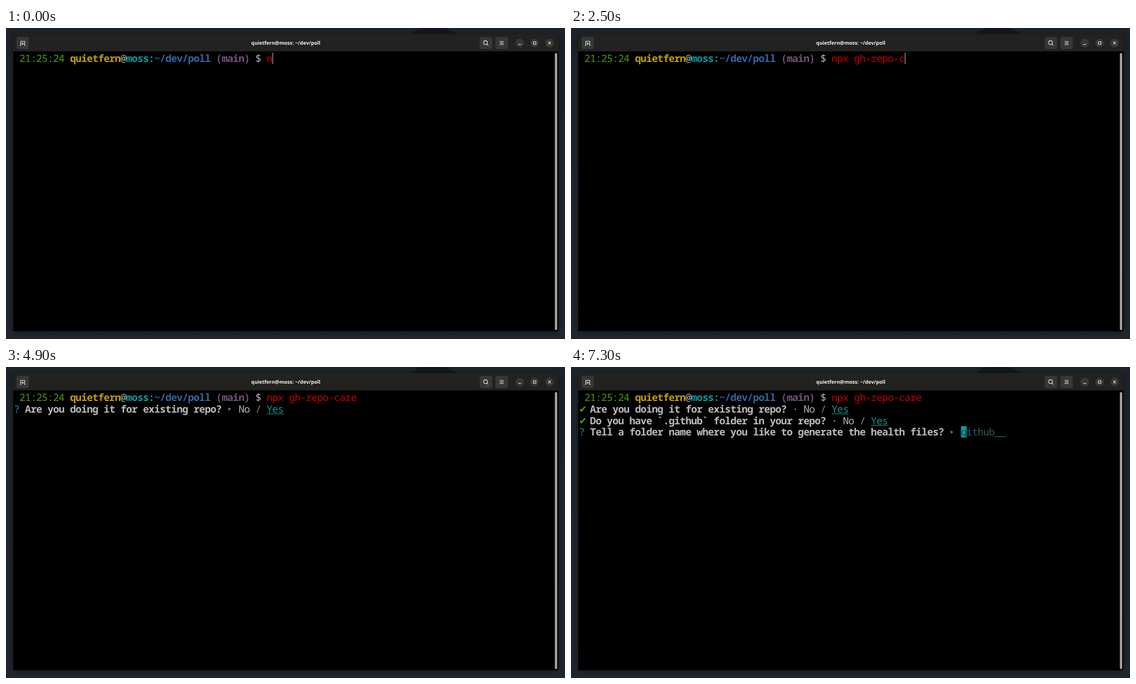
These frames come from a looping animation (1003 px wide and 559 px high, 8 s). An HTML page:

```html
<!DOCTYPE html>
<html lang="en">
<head>
<meta charset="utf-8">
<title>Terminal</title>
<style>
  html, body { margin: 0; width: 100%; height: 100%; overflow: hidden; background: #1e242b; }
  svg { display: block; width: 1003px; height: 559px; }
  text { text-rendering: geometricPrecision; }
  .term { font: 18px "Noto Sans Mono", monospace; letter-spacing: -.72px; }
  .bold { font-weight: 600; }
  .tick { font: 18px "DejaVu Sans", sans-serif; letter-spacing: 0; }
  .title { font: 700 9px "Open Sans", sans-serif; fill: #f4f4f2; text-anchor: middle; }
  .icon { fill: none; stroke: #eee; stroke-width: 1.1; }
</style>
</head>
<body>
<svg viewBox="0 0 1003 559">
  <defs>
    <linearGradient id="desk" x2="0" y2="1">
      <stop offset="0" stop-color="#1c232a"/>
      <stop offset="1" stop-color="#20262e"/>
    </linearGradient>
    <filter id="blur" x="-5%" y="-5%" width="110%" height="110%"><feGaussianBlur stdDeviation="4"/></filter>
  </defs>
  <rect width="1003" height="559" fill="url(#desk)"/>
  <path d="M726 12Q738 0 747 0H787Q800 5 810 12Z" fill="#12181d"/>
  <rect x="13" y="13" width="978" height="534" rx="9" opacity=".4" filter="url(#blur)"/>
  <path d="M13 545V20Q13 11 22 11H982Q991 11 991 20V545Z"/>
  <path d="M13 42V20Q13 11 22 11H982Q991 11 991 20V42Z" fill="#222220"/>
  <text class="title" x="502" y="30.4">quietfern@moss: ~/dev/poll</text>

  <g fill="#373735">
    <rect x="19" y="16" width="22" height="22" rx="4"/>
    <rect x="850" y="16" width="22.5" height="22" rx="4"/>
    <rect x="878" y="16" width="22.5" height="22" rx="4"/>
    <circle cx="921.7" cy="27" r="7.7"/>
    <circle cx="948.5" cy="27" r="7.7"/>
    <circle cx="975.3" cy="27" r="7.7"/>
  </g>
  <g class="icon">
    <path d="M25 31.3H26.5V24H33.5V31.3H35M30 26V30.4M27.8 28.2H32.2"/>
    <circle cx="860.3" cy="26.3" r="3.4"/>
    <path d="M862.8 28.8L865.4 31.4M885.8 24.2H892.8M885.8 27H892.8M885.8 29.8H892.8"/>
    <path d="M919.3 29.5H924.3M946.3 24.8H950.8V29.3H946.3ZM973 24.7L977.6 29.3M977.6 24.7L973 29.3"/>
  </g>
  <rect x="984.8" y="45" width="4.2" height="498" rx="2.1" fill="#a5a3a0"/>
  <g id="screen" class="term"></g>
</svg>
<script>
const LOOP = 8000, LEFT = 14.3, CELL = 10.08, TOP = 44.3, LINE = 20.7;
const BASELINE = 16.9, BEARING = -.36;
const GREEN = '#4e9a06', TEAL = '#16918f', GREY = '#b4b4b4', DIM = '#858585', WHITE = '#bababa';
const COMMAND = 'npx gh-repo-care';
const COMMAND_COL = 45;
// Time and number of characters typed from then on.
const TYPING = [[0, 1], [300, 2], [500, 3], [700, 4], [900, 5], [1100, 6], [1400, 7], [1600, 8],
  [1800, 9], [1900, 10], [2000, 11], [2200, 12], [2500, 13], [2700, 15], [2900, 16]];
const PROMPT = [
  [1, '21:25:24', GREEN], [10, 'quietfern', '#c4a000', 'bold'], [19, '@', GREY],
  [20, 'moss:', '#06989a', 'bold'], [25, '~/dev/poll', '#3465a4', 'bold'],
  [36, '(main)', '#75507b', 'bold'], [43, '$', GREY]
];

const colX = col => LEFT + col * CELL;
const rowY = row => TOP + row * LINE;
const put = (row, col, text, fill, cls = '') =>
  `<text x="${colX(col) + BEARING}" y="${rowY(row) + BASELINE}" fill="${fill}" class="${cls}">${text}</text>`;
const rect = (x, y, w, h, fill) =>
  `<rect x="${x}" y="${y}" width="${w}" height="${h}" fill="${fill}"/>`;
const caret = (row, col) => rect(colX(col), rowY(row), 1.1, LINE, '#b0b0b0');

function question(row, text, done) {
  const end = text.length + 3, x = colX(end) + 1.6, y = rowY(row) + 10.6;
  const mark = done
    ? `<text class="tick" x="14" y="${rowY(row) + BASELINE}" fill="${GREEN}">✔</text>`
    : put(row, 0, '?', TEAL);
  const pointer = done
    ? put(row, end, '·', GREY)
    : `<path d="M${x} ${y - 2.8}l5 2.8l-5 2.8z" fill="#777"/>`;
  return mark + put(row, 2, text, WHITE, 'bold') + pointer;
}

function choice(row, col, text, selected) {
  const line = rect(colX(col), rowY(row) + 18.6, text.length * CELL, 1.2, TEAL);
  return put(row, col, text, selected ? TEAL : GREY) + (selected ? line : '');
}

function toggle(row, text, yes, done) {
  const col = text.length + 5;
  return question(row, text, done) + choice(row, col, 'No', !yes)
    + put(row, col + 3, '/', DIM) + choice(row, col + 5, 'Yes', yes);
}

function folderInput(row, text) {
  const col = text.length + 5;
  return question(row, text, false)
    + rect(colX(col), rowY(row), CELL, LINE, '#119a9c')
    + put(row, col, 'g', '#0b4a4b') + put(row, col + 1, 'ithub__', '#285e5d');
}

function render(t) {
  const typed = TYPING.filter(([start]) => start <= t).pop()[1];
  let out = PROMPT.map(run => put(0, ...run)).join('')
    + put(0, COMMAND_COL, COMMAND.slice(0, typed), '#c40000');
  if (t < 3100) out += caret(0, COMMAND_COL + typed);
  else if (t < 3500) out += caret(1, 0);
  else out += toggle(1, 'Are you doing it for existing repo?', t >= 4900, t >= 5100);
  if (t >= 5100) out += toggle(2, 'Do you have `.github` folder in your repo?', t >= 6700, t >= 7100);
  if (t >= 5100 && t < 7100 && (t < 5700 || t >= 6300)) out += caret(2, 50);
  if (t >= 7100) out += folderInput(3, 'Tell a folder name where you like to generate the health files?');
  return out;
}

const screenGroup = document.getElementById('screen');
const begin = performance.now();
let shown = '';
function tick() {
  const next = render((performance.now() - begin) % LOOP);
  if (next !== shown) screenGroup.innerHTML = shown = next;
  requestAnimationFrame(tick);
}
tick();
</script>
</body>
</html>
```
